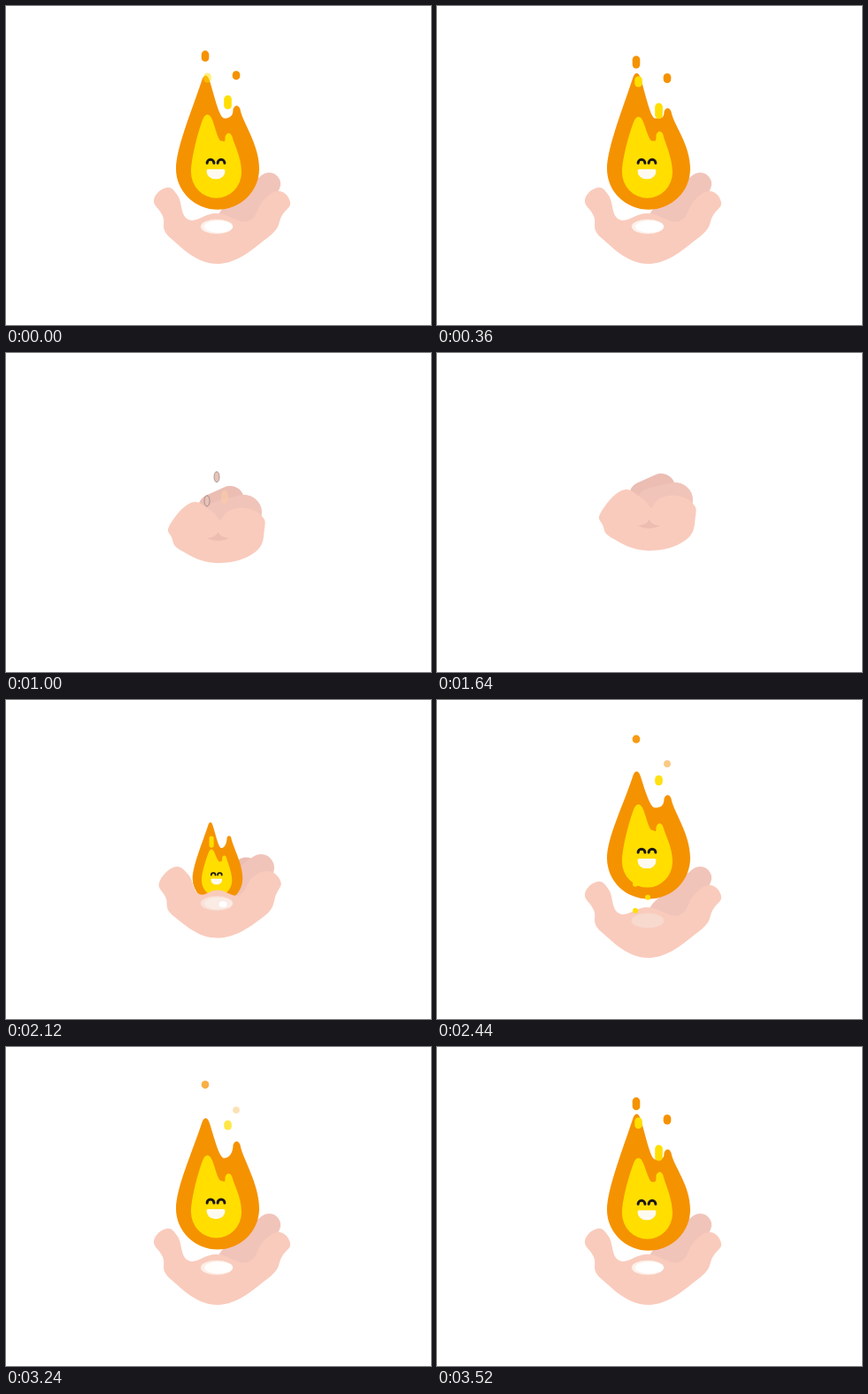
An HTML page with a canvas that plays this animation: 480x360 px, repeating every 3.56 s.

```html
<!DOCTYPE html>
<html lang="en">
<head>
<meta charset="utf-8">
<title>Flame in hand</title>
<style>
html, body { margin: 0; width: 100%; height: 100%; overflow: hidden; background: #fff; }
canvas { display: block; }
</style>
</head>
<body>
<canvas id="stage" width="480" height="360"></canvas>
<script>
const ctx = document.getElementById('stage').getContext('2d');
const LOOP = 3560, FLICKER = LOOP / 9;
const SKIN = '#f9cbbc', SKIN_MID = '#f1c4ba', SKIN_BACK = '#ebbdb3';
const ORANGE = '#f59200', YELLOW = '#ffde00';

// palm: key points of a smooth outline, clockwise from the thumb.
// mid, back: fingers, each the hull of a base circle and a tip circle (x, y, r).
const OPEN = {
  palm: [167,219, 181,205, 194,214, 206,241, 238,234, 273,243, 291,219,
    309,209, 321,222, 312,236, 296,261, 239,291, 186,262, 177,237],
  mid: [262,245,24, 297,201,13],
  back: [258,245,18, 280,210,12]
};
const WIDE = {
  palm: [155,241, 169,227, 183,234, 201,257, 238,246, 278,261, 300,239,
    320,234, 332,246, 321,259, 298,281, 240,297, 193,283, 170,257],
  mid: [266,258,18, 305,221,13],
  back: [250,248,14, 281,208,13]
};
const FIST = {
  palm: [185,180, 209,155, 230,163, 241,174, 242,175, 243,174, 252,164,
    270,161, 288,169, 292,184, 281,211, 238,223, 198,209, 187,194],
  mid: [244,172,20, 269,166,20],
  back: [233,161,16, 253,152,16]
};

// Drops leave the flame at a phase of the flicker, rise, shrink and fade.
const DROPS = [
  { x: 225, color: ORANGE, start: 325, y: 70, speed: 0.187, height: 16, life: 180 },
  { x: 260, color: ORANGE, start: 205, y: 96, speed: 0.093, height: 16, life: 280 },
  { x: 227.5, color: YELLOW, start: 140, y: 113, speed: 0.125, height: 22, life: 280 },
  { x: 250.5, color: YELLOW, start: 325, y: 128, speed: 0.27, height: 20, life: 180 }
];

const mix = (a, b, u) => a + (b - a) * u;
const mixAll = (a, b, u) => a.map((v, i) => mix(v, b[i], u));
const clamp = u => Math.min(1, Math.max(0, u));
const ease = u => u < 0.5 ? 4 * u ** 3 : 1 - 4 * (1 - u) ** 3;
const ramp = (time, from, to) => ease(clamp((time - from) / (to - from)));

function fill(color, alpha, trace) {
  ctx.globalAlpha = alpha;
  ctx.fillStyle = color;
  ctx.beginPath();
  trace();
  ctx.fill();
  ctx.globalAlpha = 1;
}
function ellipse(x, y, rx, ry, color, alpha = 1) {
  fill(color, alpha, () => ctx.ellipse(x, y, rx, ry, 0, 0, Math.PI * 2));
}
function pill(x, y, height, color, alpha = 1) {
  const r = Math.min(4.3, height / 2);
  fill(color, alpha, () => ctx.roundRect(x - r, y - height / 2, r * 2, height, r));
}
function finger([x1, y1, r1, x2, y2, r2], color) {
  const angle = Math.atan2(y2 - y1, x2 - x1);
  const side = Math.acos((r1 - r2) / Math.hypot(x2 - x1, y2 - y1));
  fill(color, 1, () => {
    ctx.arc(x1, y1, r1, angle + side, angle - side);
    ctx.arc(x2, y2, r2, angle - side, angle + side);
  });
}
function smoothShape(flat, color) {
  const n = flat.length / 2, pull = 0.21;
  const at = i => [flat[(i + n) % n * 2], flat[(i + n) % n * 2 + 1]];
  fill(color, 1, () => {
    ctx.moveTo(...at(0));
    for (let i = 0; i < n; i++) {
      const [[ax, ay], [bx, by], [cx, cy], [dx, dy]] = [i - 1, i, i + 1, i + 2].map(at);
      ctx.bezierCurveTo(bx + (cx - ax) * pull, by + (cy - ay) * pull,
        cx - (dx - bx) * pull, cy - (dy - by) * pull, cx, cy);
    }
  });
}

// A round body that narrows into a tall left tip, a dip and a short right tip.
function flameLayer(color, { cx, r, mid, base, w, tip: [tx, ty], dip: [dx, dy], side: [sx, sy] }) {
  fill(color, 1, () => {
    ctx.moveTo(cx - r, mid);
    ctx.bezierCurveTo(cx - r, mid - r / 2, tx - w - r * 0.22, ty + r * 0.8, tx - w, ty + 6);
    ctx.bezierCurveTo(tx - w / 2, ty - 2, tx + w / 2, ty - 2, tx + w, ty + 6);
    ctx.bezierCurveTo(tx + w + r * 0.12, ty + r / 2, dx - r * 0.12, dy, dx, dy);
    ctx.bezierCurveTo(dx + r * 0.13, dy, sx - 4, sy + 12, sx - 4, sy + 4);
    ctx.bezierCurveTo(sx - 2, sy - 1.3, sx + 2, sy - 1.3, sx + 4, sy + 4);
    ctx.bezierCurveTo(sx + 4 + r * 0.05, sy + r * 0.4, cx + r, mid - r * 0.6, cx + r, mid);
    ctx.ellipse(cx, mid, r, base - mid, 0, 0, Math.PI);
  });
}

function drawFace(dy) {
  ctx.strokeStyle = '#1d1717';
  ctx.lineWidth = 3;
  ctx.lineCap = 'round';
  for (const x of [231, 243]) {
    ctx.beginPath();
    ctx.arc(x, 176.5 + dy, 3.9, Math.PI, 0);
    ctx.stroke();
  }
  fill('#fffaf0', 1, () => ctx.roundRect(226.5, 183.5 + dy, 21, 11, [2, 2, 10, 10]));
}

function drawFlame(time) {
  const phase = time % FLICKER;
  const wave = degrees => Math.cos(phase / FLICKER * Math.PI * 2 + degrees * Math.PI / 180);
  const hop = 4 * Math.sin(Math.PI * clamp((time - 2260) / 360));
  const dy = -0.6 + 1.4 * wave(20) - hop;
  const stretch = (phase + 70) % FLICKER;

  flameLayer(ORANGE, {
    cx: 239, r: 47, mid: 183 + dy, base: 229 + dy, w: 4.5,
    tip: [225.5, 75 + 5.5 * wave(-50)],
    dip: [246.5, 126 + dy],
    side: [260.5, stretch < 270 ? 118 - stretch * 0.078 : 118]
  });
  flameLayer(YELLOW, {
    cx: 237.5, r: 28.5, mid: 187 + dy, base: 216 + dy, w: 5.5,
    tip: [227.5, 126.5 + 5 * wave(-220) - hop],
    dip: [243, 151.5 + dy],
    side: [251.5, 139 + 5 * wave(-30) - hop]
  });
  drawFace(dy);

  for (const { x, color, start, y, speed, height, life } of DROPS) {
    const age = (phase - start + FLICKER) % FLICKER;
    if (age < life) pill(x, y - age * speed, height * (1 - 0.55 * age / life), color, clamp((life - age) / 45));
  }
}

// A few sparks rise from the palm just after the flame returns.
function drawSparks(time) {
  if (time < 2280 || time > 2540) return;
  for (let i = 0; i < 3; i++) pill(i === 1 ? 238 : 224, 238 - i * 15 - (time - 2440) * 0.15, 6, YELLOW);
}

// Faint puffs escape from the closing fist.
function drawPuffs(time) {
  if (time < 940 || time > 1180) return;
  const rise = (time - 1000) * 0.13;
  ctx.strokeStyle = '#8d7c77';
  ctx.lineWidth = 0.7;
  for (const [x, y] of [[238, 140], [227, 167]]) {
    ellipse(x, y - rise, 3, 6, '#e8c3b8');
    ctx.stroke();
  }
  ellipse(247, 163 - rise, 4, 8, '#f9cbaa', 0.7);
}

function drawGlow(y, white) {
  ellipse(238, y, 18.5, 8.5, '#f6d6ca');
  ellipse(238, y, 18, 8, '#fff1ea', 0.1 + 0.9 * white);
  ellipse(240, y, 16, 6.8, '#fff', white);
  ellipse(245, y + 1, 4.5, 3.5, '#fff', clamp(white * 3));
}

function draw(time) {
  const grip = ramp(time, 700, 960), release = ramp(time, 1760, 2400);
  const closed = grip - release;
  const spread = release ? 0 : ramp(time, 460, 620);
  const sink = 14 * (grip - ramp(time, 1030, 1300));
  const size = 1 - ramp(time, 720, 960) + ramp(time, 1960, 2260);
  const part = name => mixAll(mixAll(OPEN[name], WIDE[name], spread), FIST[name], closed);
  const palm = part('palm');

  ctx.fillStyle = '#fff';
  ctx.fillRect(0, 0, 480, 360);

  ctx.save();
  ctx.translate(0, sink);
  finger(part('back'), SKIN_BACK);
  finger(part('mid'), SKIN_MID);
  ctx.restore();

  if (size > 0.01) {
    ctx.save();
    ctx.translate(239, 232);
    ctx.scale(size, size);
    ctx.translate(-239, -232);
    drawFlame(time);
    ctx.restore();
  }

  ctx.save();
  ctx.translate(0, sink);
  smoothShape(palm, SKIN);
  fill('#ecbdb0', clamp(closed * 10 - 9), () => {
    ctx.moveTo(239.5, 188);
    ctx.quadraticCurveTo(242, 194, 252, 195);
    ctx.quadraticCurveTo(239.5, 201, 227, 195);
    ctx.quadraticCurveTo(237, 194, 239.5, 188);
  });
  // The glow sits just below the top of the palm, the fifth key point.
  const white = 1 - release + ramp(time, 2600, 3500);
  if (closed < 0.4) drawGlow(palm[9] + 15, white);
  ctx.restore();

  drawSparks(time);
  drawPuffs(time);
}

function frame() {
  draw(performance.now() % LOOP);
  requestAnimationFrame(frame);
}
frame();
</script>
</body>
</html>
```
